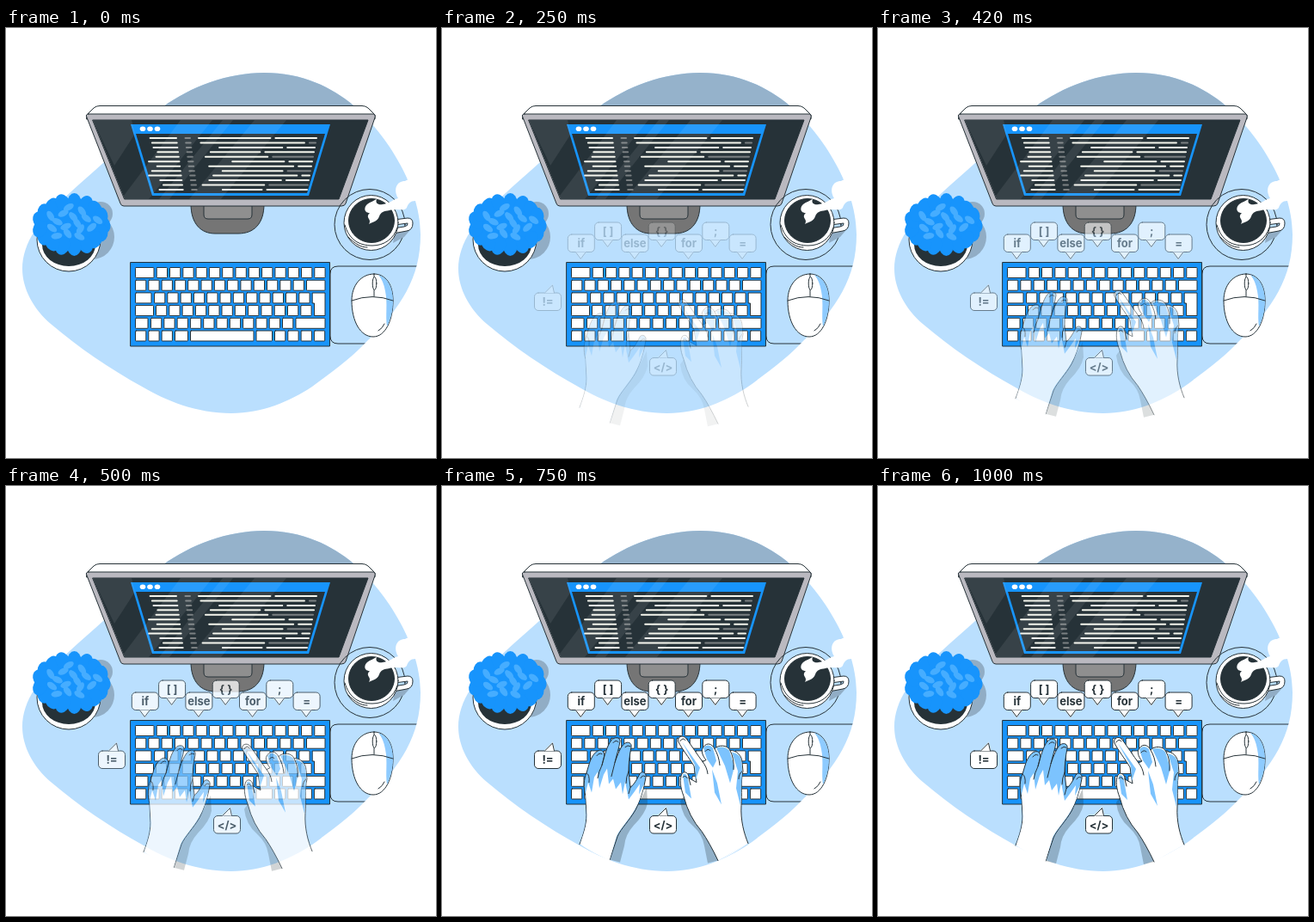
Recreate the animation shown at these times as an HTML page. Size 500x500 px, loop 1040 ms.

```html
<!DOCTYPE html>
<html lang="en">
<head>
<meta charset="utf-8">
<title>Typing at a desk</title>
<style>
html, body { margin: 0; width: 100%; height: 100%; overflow: hidden; background: #fff; }
svg { display: block; width: 100%; height: 100%; }
.ink { stroke: #263238; stroke-width: 1; stroke-linejoin: round; stroke-linecap: round; }
.line { fill: none; }
text { font: 700 13px Inter, "Open Sans", sans-serif; text-anchor: middle; fill: #263238; }
</style>
</head>
<body>
<svg viewBox="0 0 500 500">
  <defs>
    <path id="blob" d="M300 52C345 52 379 69 404 90C436 117 482 180 482 240C482 290 460 325 417 367C400 385 375 403 356 417C330 434 298 448 262 448C222 448 185 433 160 418C120 396 85 372 52 344C32 327 19 303 19 280C19 250 40 222 64 201C85 182 98 170 120 151C145 126 160 106 182 92C215 68 258 52 300 52Z"/>
    <clipPath id="desk"><use href="#blob"/></clipPath>
    <clipPath id="glass"><path d="M101 107H421L387 199H138Z"/></clipPath>
  </defs>
  <use href="#blob" fill="#badffe"/>
  <path clip-path="url(#desk)" fill="#95b2cb" d="M150 40H450V94H150Z"/>

  <!-- monitor -->
  <path class="ink" fill="#757575" d="M215 205C215 228 227 239 243 239H270C288 239 300 228 300 205Z"/>
  <path class="ink" fill="#8f8f8f" d="M230 207V217Q230 222 235 222H281Q286 222 286 217V207Z"/>
  <path class="ink" fill="#fff" d="M94 101L102 93Q105 90.5 109 90.5H414Q418 90.5 421 93L429 101V106H94Z"/>
  <path class="ink" fill="#bab9c0" d="M96 100H426Q430 100 429 104L395 204Q394 207 390 207H137Q134 207 133 204L94 104Q92 100 96 100Z"/>
  <path class="ink" fill="#263238" d="M101 107H421L387 199H138Z"/>
  <path fill="#1794fc" d="M145 112H377L352 195H170Z"/>
  <path fill="#263238" d="M151 123H371L350 192H172Z"/>
  <g id="dots" fill="#fff"></g>
  <g id="code" stroke-width="2" stroke-linecap="round"></g>
  <path clip-path="url(#glass)" fill="#fff" opacity=".08" d="M101 107H146L150 123L126 160ZM203 107H240L166 199H134ZM252 107H264L190 199H178ZM289 107H326L250 199H213Z"/>

  <!-- plant -->
  <circle cx="100" cy="243" r="26" fill="#91adc5"/>
  <circle cx="110" cy="216" r="14" fill="#91adc5"/>
  <circle class="ink" cx="73" cy="246" r="37" fill="#fff"/>
  <ellipse cx="73" cy="252" rx="31" ry="25" fill="#263238"/>
  <ellipse cx="75" cy="228" rx="39" ry="28" fill="#1794fc"/>
  <g id="leaves"></g>

  <!-- coffee -->
  <circle class="ink line" cx="423" cy="228.5" r="41"/>
  <path fill="#91adc5" d="M453 232L469 236L463 243L450 250Z"/>
  <path class="ink" fill="#fff" d="M451 223L467 221Q473 221 473 227Q473 235 466 236L450 239V233L463 231Q468 230 467 227L452 229Z"/>
  <ellipse class="ink" cx="424.500" cy="226.500" rx="31.500" ry="32" fill="#fff"/>
  <path class="ink line" d="M394 229C399 246 410 253 426 253C440 253 451 245 455 232M398 243C406 251 412 255 420 255"/>
  <ellipse class="ink" cx="425" cy="224" rx="26.5" ry="25.5" fill="#263238"/>
  <path fill="#fff" d="M422 228C426 222 417 221 423 215C415 215 416 206 423 203C428 201 428 200 431 199C429 204 433 206 438 205C446 204 449 200 456 198C450 188 454 178 464 178C470 174 479 176 482 180V202C472 199 468 203 466 209C462 214 454 209 446 212C439 213 436 214 434 219C432 225 427 225 422 228Z"/>

  <!-- mouse -->
  <path class="ink line" clip-path="url(#desk)" d="M490 277H386Q377 277 377 286V358Q377 367 386 367H450"/>
  <path class="ink" fill="#fff" d="M428 286C413 286 402 299 402 317C402 341 412 359 427 359C441 359 450 340 450 317C450 299 442 286 428 286Z"/>
  <path fill="#8ecbff" d="M433 287C444 290 450 302 450 317C450 329 447 340 443 347C441 335 444 320 441 306Q439 294 433 287Z"/>
  <path class="ink line" d="M402 317Q426 308 450 317M428 286V312M433 352Q438 349 440 344"/>
  <ellipse class="ink" cx="428.5" cy="297" rx="2.3" ry="7.5" fill="#fff"/>

  <rect class="ink" x="145" y="272.5" width="231.5" height="97.5" fill="#1794fc"/>
  <g id="keys" class="ink" fill="#fff"></g>
  <g id="bubbles"></g>

  <g id="hands">
    <path fill="#263238" opacity=".28" d="M195 436L204 409L225 378L238 352L239 370Q237 382 223 396Q213 407 212 420L207 439ZM321 437Q311 416 302 403Q287 386 281 362L277 368Q279 386 292 397Q303 407 305 420L309 440Z"/>
    <path class="ink" fill="#7cc3fe" d="M160 418C165 405 168 395 168 384L167 362C164 352 165 342 168 335L171 325C173 318 177 311 182 309C187 307 190 312 188 318L186 326C189 315 192 303 197 297C200 293 207 293 207 298C206 306 203 314 201 323C204 314 208 304 212 301C216 298 221 300 220 305C218 315 217 325 217 333L219 352C223 349 227 342 230 336C233 332 238 335 237 340C235 352 231 366 225 378C218 390 208 400 204 409L195 436"/>
    <path fill="#fff" d="M160.500 418C165 405 168.500 395 168.500 384L167 358L170 346L174 358L177 340L181 334L183 353L188 337L192 330L194 348L199 342L202 354L208 346L210 360L213 345L217 366L223 358L230 348L229 360L235 348C233 358 230 368 224 378C217 390 207 400 203 409L194.500 437C183 431 170 425 160.500 418Z"/>
    <path class="ink line" d="M168 335Q172 337 171 346M186 326Q182 334 181 341M201 323L197 339M217 333Q214 340 214 347M219 352L217 359M180 315Q183 311 186 313M199 300Q202 296 205 299M213 305Q216 302 219 304M231 341Q233 337 236 339"/>
    <path class="ink" fill="#fff" d="M321 437Q311 416 302 403Q287 386 281 362C277 352 276 342 279 336C282 332 287 335 287 341L296 346L293 327C287 317 279 307 275 299C273 293 280 290 284 295C290 303 297 314 303 322L307 320C302 314 301 308 304 305C308 299 314 301 317 307C321 302 332 302 335 309C342 308 349 315 349 323L350 333C347 345 349 360 348 373C347 390 351 405 356 417"/>
    <path fill="#fff" d="M321 437L356 417Q339 429 321 437Z"/>
    <path fill="#7cc3fe" d="M304 306Q309 300 315 306L319 321L315 329L308 319ZM319 306Q328 303 334 309L340 328L335 347L329 327ZM337 311Q348 313 348.5 323L349 333L347 373L342 353L344 333ZM280 337Q284 334 286 342L290 365L283 358ZM314 331L320 347L325 372L317 358ZM279 299L294 326L295 343L300 329Z"/>
    <path class="ink line" d="M303 322Q308 328 309 336M317 307Q322 315 323 326M335 309Q340 318 339 331M349 333Q345 336 345 342M287 341L289 349M277 298Q280 293 283 297M306 310Q309 306 312 309M280 340Q283 337 285 341"/>
  </g>
</svg>
<script>
const $ = id => document.getElementById(id);
const list = (n, draw) => Array.from({ length: n }, (_, i) => draw(i)).join('');

let seed = 11;
const rand = (lo, hi) => {
  seed = seed * 16807 % 2147483647;
  return lo + (hi - lo) * seed / 2147483647;
};
const oval = (x, y, rx, ry, fill = 'inherit', tilt = 0) =>
  `<ellipse cx="${x}" cy="${y}" rx="${rx}" ry="${ry}" fill="${fill}" transform="rotate(${tilt} ${x} ${y})"/>`;

$('dots').innerHTML = list(3, i => oval(159 + i * 8.5, 117.3, 3.3, 2.8));

// Code listing: a short bright column, dim line numbers, then statements of varying length
$('code').innerHTML = list(12, row => {
  const y = 128 + row * 5.45;
  const dash = (from, to, dim) =>
    `<path d="M${from} ${y}H${to}" stroke="${dim ? '#7b8082' : '#f4f5ec'}"/>`;
  const start = 224 + row * .4, end = 361 - row;
  const left = rand(start, start + 45), right = rand(left + 40, end);
  return dash(rand(162, 180) + row * .5, 198 + row * .7) +
    dash(208.5 + row * .7, 214 + row * .7, true) +
    dash(left, right) +
    (end - right > 12 ? dash(right + 6, end, row % 3 === 1) : '');
});

// Foliage: a ring of tufts around a solid middle, with lighter leaves in spiral order
$('leaves').innerHTML =
  list(17, i => {
    const a = i / 17 * Math.PI * 2;
    return oval(76 + 37 * Math.cos(a), 228.5 + 26 * Math.sin(a), 8, 10.5, '#1794fc', i % 3 * 25 - 25);
  }) +
  list(16, i => {
    const a = i * 2.4, r = Math.sqrt((i + .5) / 16);
    return oval(77 + 33 * r * Math.cos(a), 227 + 19 * r * Math.sin(a), 6.5, 3.6, '#46adff', rand(-60, 60));
  });

// Keyboard rows
const rowY = row => 278.5 + row * 14.7;
const key = (row, x, end) =>
  `<rect x="${x}" y="${rowY(row)}" width="${end - x}" height="12" rx=".8"/>`;
const run = (row, x, n) =>
  list(n, i => key(row, x + i * 15.3, x + i * 15.3 + 12.3));
$('keys').innerHTML =
  key(0, 150.5, 172) + run(0, 175.2, 13) +
  run(1, 150.5, 13) + key(1, 349.5, 371) +
  key(2, 150.5, 169) + run(2, 172.5, 12) +
  key(3, 150.5, 171.5) + run(3, 174.5, 12) +
  '<path d="M356.5 308H371V334.5H358.5V320H356.5Z"/>' +
  key(4, 150.5, 165) + run(4, 168.5, 11) + key(4, 337, 371) +
  run(5, 150.5, 3) + key(5, 196.5, 211.5) + key(5, 214.5, 288) +
  key(5, 291, 309.5) + run(5, 312.5, 4);

// A rounded label with its tail below, or above at the given offset
const bubble = (label, x, y, upTail) => {
  const tail = upTail
    ? `M${x + upTail - 9} ${y}L${x + upTail} ${y - 9}L${x + upTail + 2} ${y}`
    : `M${x + 9} ${y + 20.5}L${x + 15} ${y + 28.5}L${x + 21} ${y + 20.5}`;
  return `<rect class="ink" x="${x}" y="${y}" width="31" height="20.5" rx="4.5" fill="#fff"/>
    <path d="${tail}" fill="#fff" stroke="#fff" stroke-width="1.5"/>
    <path class="ink line" d="${tail}"/>
    <text x="${x + 15.5}" y="${y + 15}">${label}</text>`;
};
const words = ['if', '[ ]', 'else', '{ }', 'for', ';', '='];
$('bubbles').innerHTML =
  words.map((word, i) => bubble(word, 146.3 + i * 31.3, i % 2 ? 226 : 240)).join('') +
  bubble('!=', 107.5, 308, 21) + bubble('&lt;/&gt;', 241.5, 383.5, 19);

// cubic-bezier(.36, -.01, .5, 1.38): slow start, slight overshoot
function ease(x) {
  const curve = (s, a, b) => 3 * (1 - s) ** 2 * s * a + 3 * (1 - s) * s * s * b + s ** 3;
  let lo = 0, hi = 1;
  for (let i = 0; i < 20; i++) {
    const mid = (lo + hi) / 2;
    if (curve(mid, .36, .5) < x) lo = mid; else hi = mid;
  }
  return curve(lo, -.01, 1.38);
}

const LOOP = 1040, STEPS = 25;
function draw() {
  const step = Math.floor((performance.now() % LOOP + 5) / LOOP * STEPS) % STEPS;
  const p = step ? ease(step / (STEPS - 1)) : 0;
  const opacity = Math.min(1, Math.max(0, p));
  $('bubbles').setAttribute('opacity', opacity);
  $('hands').setAttribute('opacity', opacity);
  $('hands').setAttribute('transform', `translate(0 ${30 * (1 - p)})`);
  requestAnimationFrame(draw);
}
draw();
</script>
</body>
</html>
```
